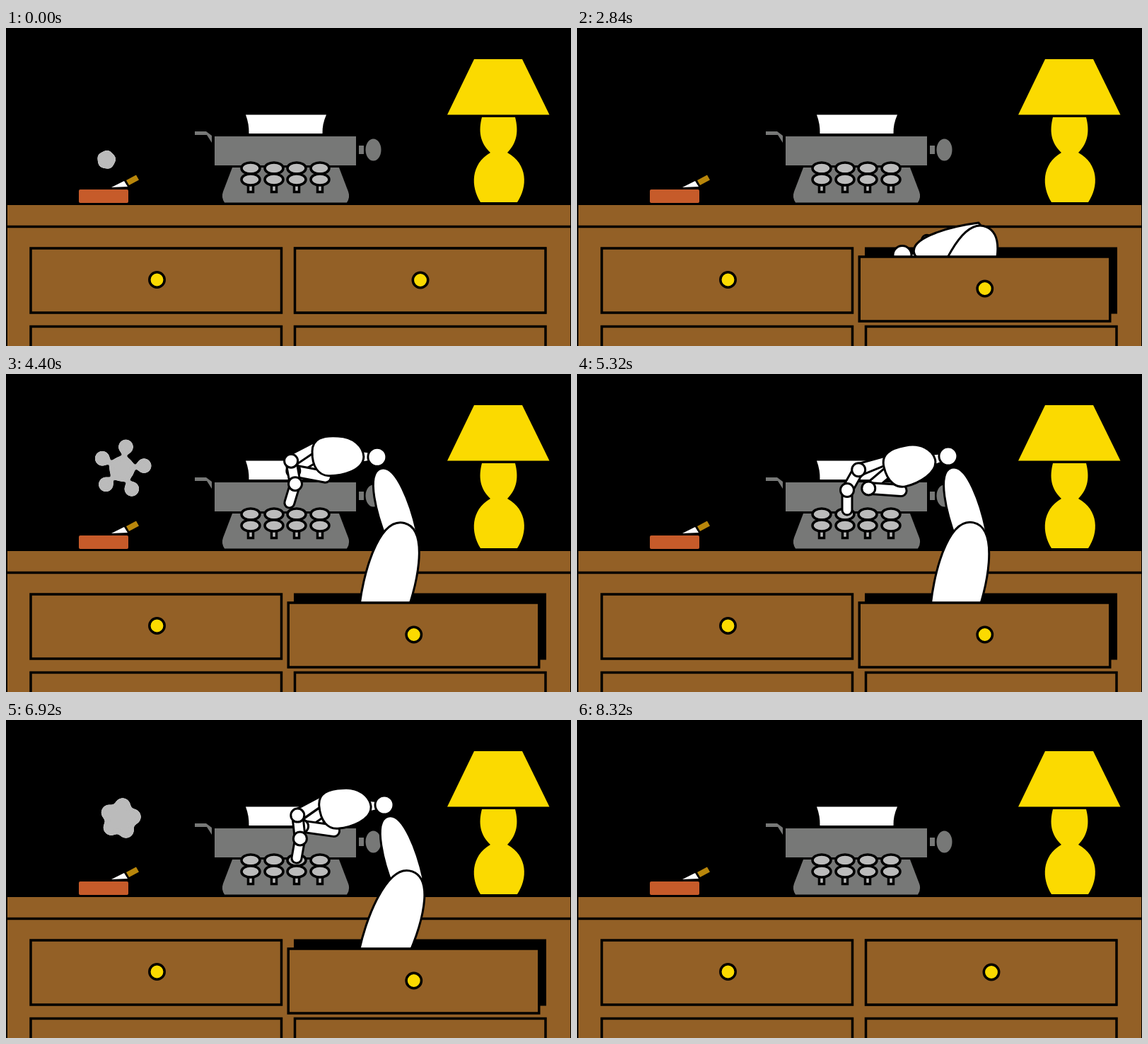
An HTML page for the animation above (8840 ms loop, 799x449 px).

```html
<!DOCTYPE html>
<html lang="en">
<head>
<meta charset="utf-8">
<title>Night typist</title>
<style>
  html, body { margin: 0; width: 100%; height: 100%; overflow: hidden; background: #000; }
  svg { display: block; width: 100vw; height: 100vh; }
  .line { stroke: #000; stroke-width: 3.5; }
  .wood { fill: #936026; }
  .gold { fill: #fbda00; }
  .metal { fill: #777877; }
  .key { fill: #bbb; }
  .limb { fill: #fff; stroke: #000; stroke-width: 3; }
</style>
</head>
<body>
<svg viewBox="0 0 799 449">
  <defs>
    <filter id="goo" filterUnits="userSpaceOnUse" x="90" y="60" width="150" height="160" color-interpolation-filters="sRGB">
      <feGaussianBlur stdDeviation="3"/>
      <feColorMatrix values="1 0 0 0 0  0 1 0 0 0  0 0 1 0 0  0 0 0 14 -6.5"/>
    </filter>
    <clipPath id="above"><rect width="799" height="324"/></clipPath>
  </defs>
  <rect width="799" height="449"/>

  <!-- lamp -->
  <g class="gold">
    <path d="M662 44H730L768.500 122.500H624Z"/>
    <path d="M673 126H720C725 145 723 162 709 176C738 192 738 224 723 246H671C657 224 657 192 685 176C670 162 668 145 673 126Z"/>
  </g>

  <!-- ashtray and smoke -->
  <rect x="103" y="228" width="70" height="19" rx="2" fill="#c65b2a"/>
  <path d="M149 225L167 216L172 224Z" fill="#fff"/>
  <path d="M170 215L184 207.5L188 214.5L174 222Z" fill="#b8860b"/>
  <g id="smoke" fill="#bbb" filter="url(#goo)"></g>

  <!-- typewriter -->
  <path d="M339 122.500H453Q447 136 447.500 149H343.500Q344 136 339 122.500Z" fill="#fff"/>
  <g class="metal">
    <path d="M267 146H283L291 152V162L284 151H267Z"/>
    <rect x="499" y="166" width="7" height="12"/>
    <ellipse cx="519.5" cy="172" rx="11" ry="15.5"/>
    <path d="M320 197H471L484 231Q487 239 482 246.500H309Q304 239 307 231Z"/>
    <rect x="295" y="153" width="200" height="41"/>
  </g>
  <g id="keys" class="key line"></g>

  <!-- dresser -->
  <rect class="wood" x="2" y="250" width="796" height="199"/>
  <path class="line" d="M0 280.500H799"/>
  <g class="wood line">
    <rect x="35" y="311" width="354.500" height="91"/>
    <rect x="35" y="421.500" width="354.500" height="91"/>
    <rect x="408.500" y="421.500" width="354.500" height="91"/>
    <circle class="gold" cx="213.500" cy="355.500" r="10.700"/>
  </g>
  <rect x="407" y="309.500" width="357" height="94"/>

  <g id="knuckles" class="limb"></g>
  <g clip-path="url(#above)">
    <g id="arm" class="limb">
      <rect id="thumb1" y="-7" width="37" height="14"/>
      <rect id="thumb2" x="-8" y="-8" width="62" height="16" rx="8"/>
      <circle id="thumbJoint" r="9.500"/>
      <path id="seg1" d="M0 -6L42 -8.500V8.500L0 6Z"/>
      <rect id="seg3" x="-7" y="-7" width="42" height="14" rx="7"/>
      <rect id="seg2" y="-7.500" width="33" height="15"/>
      <circle id="joint1" r="9.500"/>
      <circle id="joint2" r="9.500"/>
      <path id="link" d="M8 -6L26 -9V9L8 6Z"/>
      <path id="hand" d="M19 0C20 14 34 28 56 28C78 29 92 24 92 6C92 -16 82 -28 68 -28C50 -28 19 -20 19 0Z"/>
      <circle id="wrist" r="13"/>
      <path id="forearm" d="M0 -22C35 -25 98 -23 98 0C98 23 35 25 0 22Q-14 0 0 -22Z"/>
      <path id="upper" d="M-20 -32C30 -40 117 -38 117 0C117 38 30 40 -20 32Z"/>
    </g>
  </g>
  <g id="drawer">
    <rect class="wood line" x="408.500" y="311" width="354.500" height="91"/>
    <circle class="gold line" cx="586" cy="356" r="10.700"/>
  </g>
  <g id="tips" class="limb"></g>
</svg>

<script>
const LOOP = 8840, PUFF = 3160, RAD = Math.PI / 180;
const $ = id => document.getElementById(id);
const clamp = v => Math.max(0, Math.min(1, v));
const mix = (a, b, u) => a + (b - a) * u;
const smooth = u => u * u * (3 - 2 * u);
const ramp = (t, from, to) => smooth(clamp((t - from) / (to - from)));

function add(parent, tag, attrs) {
  const el = document.createElementNS('http://www.w3.org/2000/svg', tag);
  for (const k in attrs) el.setAttribute(k, attrs[k]);
  return $(parent).appendChild(el);
}

function move([x, y], angle, along, side = 0) {
  const c = Math.cos(angle * RAD), s = Math.sin(angle * RAD);
  return [x + along * c - side * s, y + along * s + side * c];
}

function place(id, [x, y], angle = 0) {
  $(id).setAttribute('transform', `translate(${x} ${y}) rotate(${angle})`);
}

// Angles of two bones of lengths m and n that reach from p to q.
function reach(p, q, m, n) {
  const aim = Math.atan2(q[1] - p[1], q[0] - p[0]);
  const d = Math.min(Math.hypot(q[0] - p[0], q[1] - p[1]), m + n);
  const a = aim + Math.acos((m * m + d * d - n * n) / (2 * m * d));
  const b = Math.atan2(d * Math.sin(aim) - m * Math.sin(a), d * Math.cos(aim) - m * Math.cos(a));
  return [a / RAD, b / RAD];
}

// Times and places where the fingertip rests on a key.
const strokes = [
  { from: 4120, to: 4280, x: 411, y: 214 },
  { from: 4600, to: 4760, x: 379, y: 214 },
  { from: 5120, to: 5320, x: 382, y: 192 },
  { from: 6200, to: 6360, x: 347, y: 214 },
  { from: 6680, to: 6840, x: 411, y: 214 }
];
const gap = (s, t) => Math.max(s.from - t, t - s.to, 0);

// Upper arm, forearm, hand, three finger bones, two thumb bones.
const folded = [-68, -192, 19, -70, -160, -155, -80, -190];
const SHOULDER = [535, 324];

function typingPose(t) {
  const n = strokes.findIndex(s => s.to > t);
  const next = strokes.at(n), prev = n < 0 ? next : strokes[Math.max(0, n - 1)];
  const u = prev === next ? 0 : ramp(t, prev.to, next.from);
  const lift = smooth(clamp(Math.min(...strokes.map(s => gap(s, t))) / 160));
  const x = mix(prev.x, next.x, u), y = mix(prev.y, next.y, u);

  const wrist = [x + 124 + (214 - y) * 0.86, 124 - (214 - y) * 0.36 - 8 * lift];
  const hand = 167 + 17 * lift, last = 90 + 20 * lift;
  const joint = move([x, y - 38 * lift], last, -28);
  const finger = reach(move(wrist, hand, 86, 14), joint, 42, 33);
  return [...reach(SHOULDER, wrist, 100, 115), hand, ...finger, last, 140 + 10 * lift, 4 + 8 * lift];
}

function drawArm(t) {
  const unfold = ramp(t, 3165, 3665) - ramp(t, 6940, 7440);
  const drop = 115 * (1 - ramp(t, 2640, 3080) + ramp(t, 7480, 7760));
  const pose = typingPose(t);
  // The hand opens later than the arm, the fingers last.
  const [a, b, h, f1, f2, f3, g1, g2] = folded.map((v, i) =>
    mix(v, pose[i], unfold ** (i < 2 ? 1 : i < 3 ? 2.4 : 3.6)));

  const shoulder = [SHOULDER[0], SHOULDER[1] + drop];
  const elbow = move(shoulder, a, 100), wrist = move(elbow, b, 115);
  const root = move(wrist, h, 86, 14), joint1 = move(root, f1, 42), joint2 = move(joint1, f2, 33);
  const base = move(wrist, h, 87, -2), thumb = move(base, g1, 37);
  place('upper', shoulder, a);
  place('forearm', elbow, b);
  place('wrist', wrist);
  place('hand', wrist, h);
  place('link', wrist, h);
  place('seg1', root, f1);
  place('seg2', joint1, f2);
  place('seg3', joint2, f3);
  place('joint1', joint1);
  place('joint2', joint2);
  place('thumb1', base, g1);
  place('thumb2', thumb, g2);
  place('thumbJoint', thumb);
}

const columns = [346, 379, 411, 444];
columns.forEach(x => add('keys', 'rect', { x: x - 3.5, y: 218, width: 7, height: 13.5 }));
columns.forEach(x => add('keys', 'ellipse', { cx: x, cy: 198, rx: 13, ry: 8 }));
const lowKeys = columns.map(x => add('keys', 'ellipse', { cx: x, rx: 13, ry: 8 }));

function drawKeys(t) {
  lowKeys.forEach((key, i) => {
    const hits = strokes.filter(s => s.y > 200 && Math.abs(s.x - columns[i]) < 5);
    const depth = hits.map(s => 1 - clamp(gap(s, t) / 80));
    key.setAttribute('cy', 214 + 6 * Math.max(0, ...depth));
  });
}

const tips = [0, 1, 2].map(i => {
  const x = 478.2 + i * 16.3;
  add('knuckles', 'rect', { x: -8.5, y: -8.5, width: 17, height: 50, rx: 8.5, transform: `translate(${x} 295.5) rotate(-8)` });
  return add('tips', 'rect', { x: -8, y: -8, width: 16, rx: 8, transform: `translate(${x - 4} 304) rotate(22)` });
});

function drawDrawer(t) {
  const y = (3.5 * ramp(t, 720, 960) + 8.5 * ramp(t, 1600, 2080)) * (1 - ramp(t, 7800, 8320));
  const x = -0.77 * y;
  const grip = ramp(t, 960, 1440) - ramp(t, 2200, 2480), curl = clamp(grip * 2 - 1);
  place('drawer', [x, y]);
  place('tips', [x, y]);
  place('knuckles', [x, y + (1 - grip) * 36]);
  $('knuckles').style.display = grip ? '' : 'none';
  $('tips').style.display = curl ? '' : 'none';
  tips.forEach(tip => tip.setAttribute('height', 16 + 17 * curl));
}

// A core with five lobes that rises, spreads and shrinks away.
const lobes = Array.from({ length: 6 }, () => add('smoke', 'circle', {}));

function drawSmoke(t) {
  const age = (t + 120) % PUFF - 120;
  const step = Math.max(0, Math.floor((age - 40) / 80) * 80 + 80);
  const grow = clamp(step / 1120), fade = clamp((step - 1120) / 640);
  const rise = 1 - (1 - grow) ** 2.7;
  const center = [mix(142, 164, rise), mix(186, 134, rise)];
  const spread = 6 + 21 * grow + 18 * fade;
  lobes.forEach((lobe, i) => {
    const [x, y] = move(center, 72 * i - 8, i < 5 ? spread : 0);
    const r = (i < 5 ? 8 + 6.5 * grow : 9 + 15 * grow) * (1 - fade);
    lobe.setAttribute('cx', x);
    lobe.setAttribute('cy', y);
    lobe.setAttribute('r', r);
  });
}

function frame(now) {
  const t = Math.floor(now % LOOP / 40) * 40;
  drawSmoke(t);
  drawKeys(t);
  drawDrawer(t);
  drawArm(t);
  requestAnimationFrame(frame);
}
frame(0);
</script>
</body>
</html>
```
